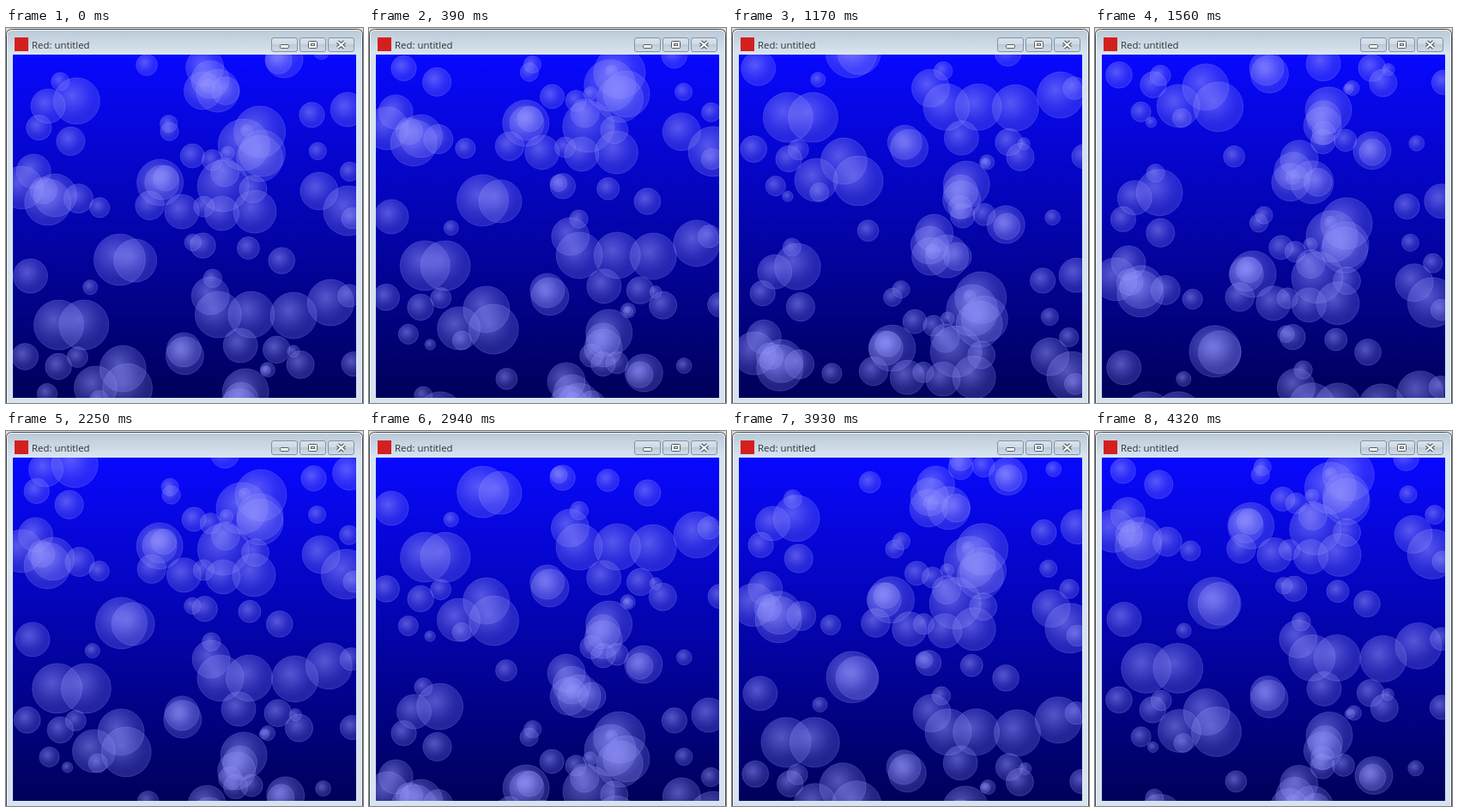
An HTML page with a canvas that plays this animation: 416 px wide and 437 px high, repeating every 4.42 s.

```html
<!DOCTYPE html>
<html lang="en">
<head>
<meta charset="utf-8">
<title>Bubbles</title>
<style>
  html, body { margin: 0; width: 100%; height: 100%; overflow: hidden; background: #e6dccd; }
  svg, canvas { position: absolute; display: block; }
  svg { left: 0; top: 0; }
  canvas { left: 8px; top: 31px; }
  text { font: 11.4px "Open Sans", "Noto Sans", sans-serif; fill: #2c3238; }
</style>
</head>
<body>
<svg width="416" height="437" viewBox="0 0 416 437">
  <defs>
    <linearGradient id="bar" x2="0" y2="1">
      <stop offset="0" stop-color="#bccad8"/>
      <stop offset="1" stop-color="#d9e5f0"/>
    </linearGradient>
    <linearGradient id="key" x2="0" y2="1">
      <stop offset="0" stop-color="#dbe4ed"/>
      <stop offset=".45" stop-color="#cfdae5"/>
      <stop offset=".5" stop-color="#bdcbd9"/>
      <stop offset="1" stop-color="#d0dce8"/>
    </linearGradient>
  </defs>
  <path d="M.5 438V7.5Q.5 1.5 7.5 1.5H408.5Q415.5 1.5 415.5 7.5V438Z" fill="#d7e3ef" stroke="#424a52"/>
  <path d="M1.5 437V8Q1.5 2.5 8 2.5H408Q414.5 2.5 414.5 8V437" fill="none" stroke="#eef4fa"/>
  <path d="M2 31V8Q2 3 8 3H408Q414 3 414 8V31Z" fill="url(#bar)"/>
  <rect x="10" y="11" width="16" height="16" fill="#d3201f"/>
  <text x="30" y="24">Red: untitled</text>
  <g fill="url(#key)" stroke="#8593a2">
    <rect x="309.5" y="11.5" width="30" height="16" rx="2.5"/>
    <rect x="342.5" y="11.5" width="30" height="16" rx="2.5"/>
    <rect x="375.5" y="11.5" width="30" height="16" rx="2.5"/>
  </g>
  <g fill="#fff" stroke="#515a64">
    <rect x="319.5" y="19.5" width="10" height="4" rx="1"/>
    <rect x="352.5" y="15.5" width="10" height="8" rx="1"/>
    <rect x="355.5" y="18.5" width="4" height="2"/>
  </g>
  <g fill="none">
    <path d="M386.500 16L394.500 23M394.500 16L386.500 23" stroke="#515a64" stroke-width="4.400"/>
    <path d="M386.500 16L394.500 23M394.500 16L386.500 23" stroke="#fff" stroke-width="2.200"/>
  </g>
</svg>
<canvas width="400" height="400"></canvas>
<script>
const ctx = document.querySelector('canvas').getContext('2d');

// Main bubbles by radius, as x, y pairs on the stage.
const clusters = {
  30: [293, 121, 278, 136, 257, 184, 136, 270],
  29: [63, 346, 93, 346, 397, 213, 144, 420],
  27: [79, 85, 292, 152, 296, 146, 52, 203, 286, 334, 333, 335,
    380, 320, 133, 397, 276, 424, 249, 334, 183, 180],
  25: [249, 73, 22, 186, 57, 195, 286, 214, 149, 271, 101, 419],
  22: [234, 46, 234, 60, 230, 73, 322, 36, 368, 190, 235, 312, 207, 382, 269, 442],
  20: [49, 91, 400, 95, 180, 180, 205, 214, 249, 216, 35, 167, 30, 289, 270, 370, 204, 375, 270, 433]
};
const smallCount = 48;

// Frames are held for a short or a long beat.
const rhythm = 'SLSSSSLLSSLSLSLSLLSLSLLLLLSSLSLSS';
const beat = { S: 120, L: 150 };
const loop = 4420;

const speed = 0.2215, delay = 78;   // px per ms, ms
const ceiling = 27, span = 435;     // a bubble above the ceiling re-enters below

let seed = 12;
function random() {
  seed = (seed * 16807) % 2147483647;
  return seed / 2147483647;
}

const bubbles = [];
function addBubble(x, y, r) {
  bubbles.push({ x, y, r, phase: random() * Math.PI * 2 });
}
for (const [r, spots] of Object.entries(clusters)) {
  for (let i = 0; i < spots.length; i += 2) addBubble(spots[i], spots[i + 1], +r);
}
for (let i = 0; i < smallCount; i++) {
  addBubble(8 + 400 * random(), ceiling + span * random(), 5 + 12 * random());
}

function stepTime(t) {
  let start = 0;
  for (const mark of rhythm) {
    if (t < start + beat[mark]) break;
    start += beat[mark];
  }
  return start;
}

const wrap = y => ceiling + ((y - ceiling) % span + span) % span;

const sea = ctx.createLinearGradient(0, 0, 0, 400);
sea.addColorStop(0, '#0808ff');
sea.addColorStop(1, '#00005a');

const tint = alpha => `rgba(150,150,255,${alpha})`;

function drawBubble(x, y, r) {
  const gx = x - r * 0.2, gy = y - r * 0.22;
  const glow = ctx.createRadialGradient(gx, gy, 0, gx, gy, r);
  glow.addColorStop(0, tint(0.56));
  glow.addColorStop(0.75, tint(0.29));
  glow.addColorStop(1, tint(0.23));
  ctx.beginPath();
  ctx.arc(x, y, r, 0, Math.PI * 2);
  ctx.fillStyle = glow;
  ctx.fill();
  ctx.strokeStyle = tint(0.24);
  ctx.stroke();
}

function draw(t) {
  const rise = speed * Math.max(0, t - delay);
  ctx.setTransform(1, 0, 0, 1, 0, 0);
  ctx.fillStyle = sea;
  ctx.fillRect(0, 0, 400, 400);
  ctx.translate(-8, -31); // stage coordinates
  for (const { x, y, r, phase } of bubbles) {
    drawBubble(x + 4 * Math.sin(t / 400 + phase), wrap(y - rise), r);
  }
}

const began = performance.now();
let shown = -1;
function tick() {
  const t = stepTime((performance.now() - began) % loop);
  if (t !== shown) draw(shown = t);
  requestAnimationFrame(tick);
}
tick();
</script>
</body>
</html>
```
